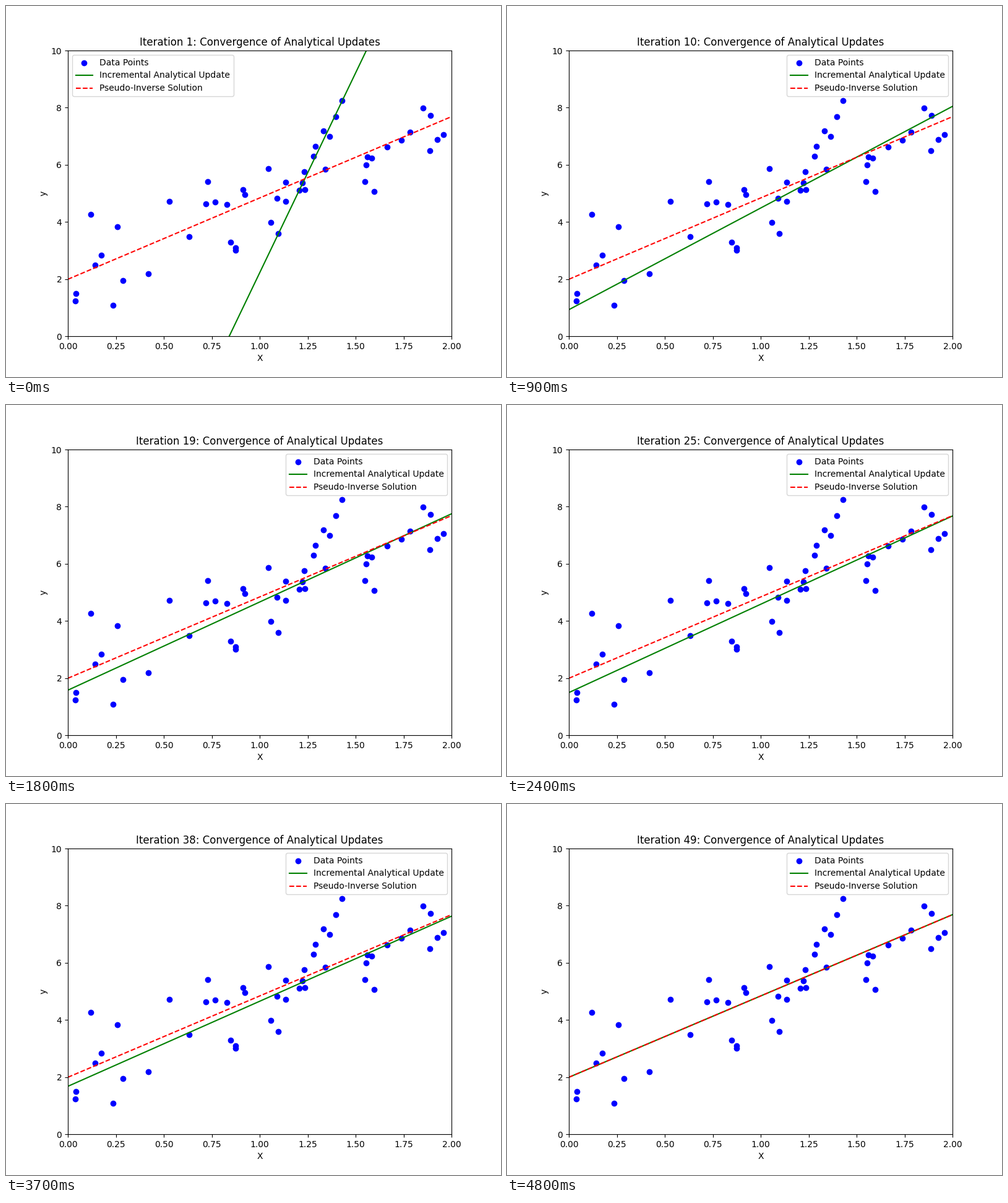
Animation of 800x600 px, one loop 4900 ms. Source, as a matplotlib script:

```python
import numpy as np
import matplotlib.pyplot as plt
from matplotlib.animation import FuncAnimation

POINTS = 50
FRAMES = POINTS - 1
INTERVAL = 100

np.random.seed(0)
x = 2 * np.random.rand(POINTS)
y = 2 + 3 * x + np.random.randn(POINTS)
ends = np.array([0.0, 2.0])


def fit_line(n):
    """Least-squares line through the first n points, at both axis ends."""
    return np.polyval(np.polyfit(x[:n], y[:n], 1), ends)


fig, ax = plt.subplots(figsize=(8, 6), dpi=100)
ax.scatter(x, y, color="blue", label="Data Points")
(fit,) = ax.plot(ends, fit_line(2), color="green",
                 label="Incremental Analytical Update")
ax.plot(ends, fit_line(POINTS), color="red", linestyle="--",
        label="Pseudo-Inverse Solution")
ax.set(xlim=(0, 2), ylim=(0, 10), xlabel="X", ylabel="y")
ax.legend(loc="best")  # placed anew on every draw, away from the lines


def update(i):
    fit.set_ydata(fit_line(i + 2))
    ax.set_title(f"Iteration {i + 1}: Convergence of Analytical Updates")
    return (fit,)


anim = FuncAnimation(fig, update, frames=FRAMES, interval=INTERVAL,
                     repeat=True, repeat_delay=0)
plt.show()
```
